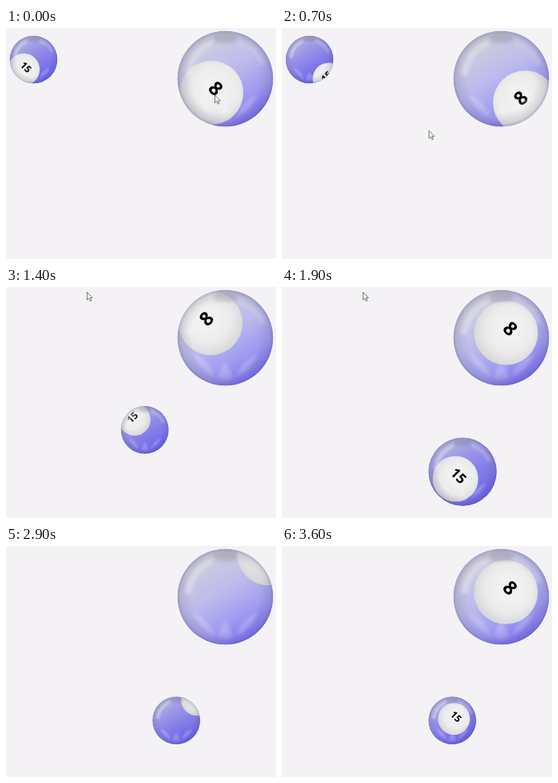
Recreate the animation shown at these times as an HTML page. Size 338 by 289 pixels, loop 3.7 s.

```html
<!DOCTYPE html>
<html lang="en">
<head>
<meta charset="utf-8">
<title>Rolling balls</title>
<style>
html, body { margin: 0; width: 100%; height: 100%; overflow: hidden; background: #f4f2f5; }
svg { display: block; width: 338px; height: 289px; }
text { font: 700 24px "Open Sans", "Noto Sans", sans-serif; text-anchor: middle; }
</style>
</head>
<body>
<svg viewBox="0 0 338 289">
  <defs>
    <clipPath id="round"><circle r="60"/></clipPath>
    <linearGradient id="pale" x1=".2" y1=".08" x2=".72" y2=".96">
      <stop offset="0" stop-color="#d2d2db"/>
      <stop offset=".45" stop-color="#bcbaec"/>
      <stop offset=".75" stop-color="#a09bf0"/>
      <stop offset="1" stop-color="#776ff2"/>
    </linearGradient>
    <linearGradient id="deep" x1=".2" y1=".06" x2=".72" y2=".96">
      <stop offset="0" stop-color="#b9b7e0"/>
      <stop offset=".4" stop-color="#958fe8"/>
      <stop offset="1" stop-color="#675eea"/>
    </linearGradient>
    <radialGradient id="spot" cx=".5" cy=".42" r=".58">
      <stop offset="0" stop-color="#f5f5f5"/>
      <stop offset=".65" stop-color="#ebebec"/>
      <stop offset="1" stop-color="#d6d6d9"/>
    </radialGradient>
    <radialGradient id="rim">
      <stop offset=".7" stop-color="#55546e" stop-opacity="0"/>
      <stop offset=".93" stop-color="#55546e" stop-opacity=".16"/>
      <stop offset="1" stop-color="#4c48a0" stop-opacity=".36"/>
    </radialGradient>
    <filter id="soft" x="-20%" y="-20%" width="140%" height="140%">
      <feGaussianBlur stdDeviation="2"/>
    </filter>
    <g id="gloss" fill="#fff" filter="url(#soft)">
      <ellipse cy="-51" rx="15" ry="7" fill="#77777f" opacity=".2"/>
      <path d="M-51 -4C-50 -27 -35 -45 -14 -50L-17 -41C-31 -36 -41 -21 -43 -4Z" opacity=".42"/>
      <path d="M16 -51C34 -46 45 -35 51 -18L44 -17C38 -29 29 -38 15 -42Z" opacity=".26"/>
      <path d="M0 30Q7 41 10 50Q0 55 -10 50Q-7 41 0 30Z" opacity=".22"/>
      <path d="M-12 50Q-34 40 -41 20Q-22 26 -12 50ZM12 50Q34 40 41 20Q22 26 12 50Z" opacity=".22"/>
    </g>
  </defs>
  <g id="big"></g>
  <g id="small"></g>
  <path id="cursor" d="M.5 .5V10.2L2.7 8.1L4.3 11.7L5.9 11L4.3 7.5H7.3Z" fill="#fff" stroke="#666" stroke-width=".9"/>
</svg>
<script>
const LOOP = 3700, STEP = 100;

// Rolls: end time, tilt, reference time, [big, small] offset there, [big, small] speed.
// Offsets are in radii, speeds in radii per 100 ms.
const rolls = [
  [350, 45, 0, [.41, .58], [.75, .75]],
  [1600, -45, 700, [.7, 1.13], [.736, .65]],
  [1950, 45, 1900, [-.14, .295], [.75, .75]],
  [2400, -45, 2300, [.14, .1], [.75, .75]],
  [LOOP, 45, 2900, [-1.28, -1.22], [-.734, -.737]]
];
const pointerPath = [[0, 261, 83.5], [500, 183.5, 128], [800, 183.5, 128], [1300, 101, 6], [LOOP, 101, 6]];
const slide = [[0, 4.5, 9.5], [800, 4.5, 9.5], [1570, 183.2, 188.2], [LOOP, 183.2, 188.2]];
const zoom = [[0, 1], [1600, 1], [1950, 1.5], [2300, 1], [LOOP, 1]];

const byId = id => document.getElementById(id);

function makeBall(id, number, fill) {
  const node = byId(id);
  node.innerHTML = `<g clip-path="url(#round)">
    <circle r="60" fill="url(#${fill})"/>
    <g class="face"><circle r="40" fill="url(#spot)"/><text y="0.8">${number}</text></g>
    <use href="#gloss"/>
    <circle r="60" fill="url(#rim)"/>
  </g>`;
  return { node, face: node.querySelector(".face") };
}

const balls = [makeBall("big", "8", "pale"), makeBall("small", "15", "deep")];
const cursor = byId("cursor");

function sample(keys, t) {
  const i = Math.max(1, keys.findIndex(k => k[0] >= t));
  const [a, b] = [keys[i - 1], keys[i]];
  const p = (t - a[0]) / (b[0] - a[0]);
  return a.slice(1).map((v, n) => v + (b[n + 1] - v) * p);
}

function wrap(y) {
  const turn = 2 * Math.PI;
  return y - turn * Math.round(y / turn);
}

function place(ball, x, y, radius) {
  ball.node.setAttribute("transform",
    `translate(${x + radius} ${y + radius}) scale(${radius / 60})`);
}

function draw(t) {
  const [, tilt, ref, offsets, speeds] = rolls.find(r => t < r[0]);
  balls.forEach((ball, i) => {
    const y = 60 * wrap(offsets[i] + speeds[i] * (t - ref) / 100);
    ball.face.setAttribute("transform", `rotate(${tilt}) translate(0 ${y})`);
  });
  place(balls[0], 214.5, 3.5, 60);
  place(balls[1], ...sample(slide, t), 30 * sample(zoom, t)[0]);
  cursor.setAttribute("transform", `translate(${sample(pointerPath, t)})`);
  cursor.style.display = t < 2000 ? "" : "none";
}

const start = performance.now();
function tick() {
  const t = (performance.now() - start) % LOOP;
  draw(Math.floor(t / STEP) * STEP);
  requestAnimationFrame(tick);
}
tick();
</script>
</body>
</html>
```
